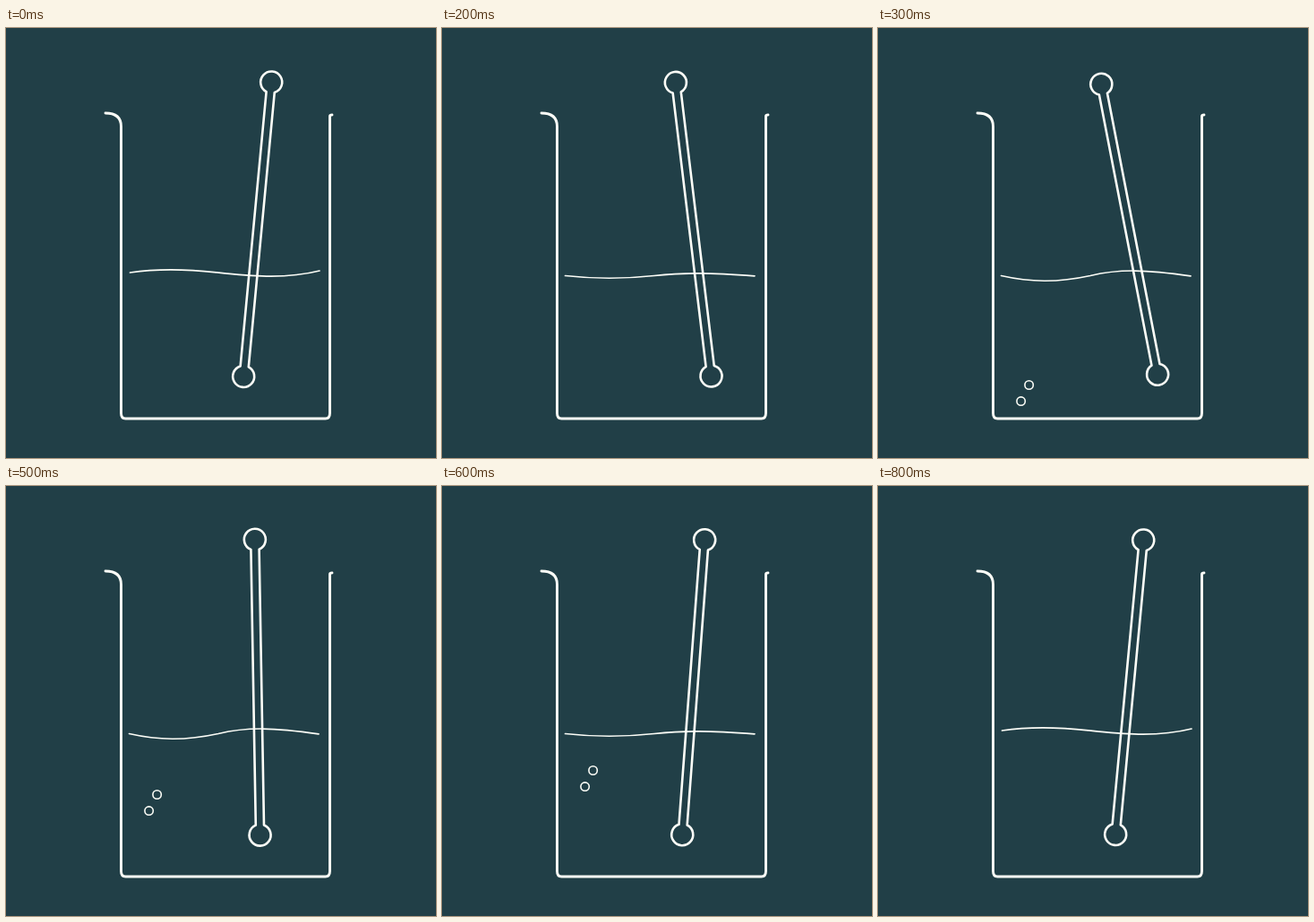
Recreate the animation shown at these times as an HTML page. Size 480 by 480 pixels, loop 0.9 s.

```html
<!DOCTYPE html>
<html lang="en">
<head>
<meta charset="utf-8">
<title>Stirred beaker</title>
<style>
  html, body { margin: 0; width: 100%; height: 100%; overflow: hidden; background: #213f47; }
  svg { display: block; width: 100%; height: 100%; }
</style>
</head>
<body>
<svg viewBox="0 0 480 480" fill="none" stroke="#fcfdf7" stroke-width="2.6" stroke-linecap="round" stroke-linejoin="round">
  <path stroke-width="2.9" d="M111 95 Q128.5 95 128.5 110 V430 Q128.5 436 133.5 436 H356.5 Q361.5 436 361.5 430 V98.5 Q361.5 97 364 97"/>
  <path id="water" stroke-width="1.7"/>
  <g id="bubbles" stroke-width="1.6">
    <circle cx="168.6" cy="398.5" r="4.7"/>
    <circle cx="159.6" cy="416.6" r="4.7"/>
  </g>
  <path id="rod" d="M-4.6 -153.9 A12 12 0 1 1 4.6 -153.9 V153.9 A12 12 0 1 1 -4.6 153.9 Z"/>
</svg>
<script>
const STEP = 100, STEPS = 9;
const [water, bubbles, rod] = ["water", "bubbles", "rod"].map(id => document.getElementById(id));

// Rod tilt in degrees at each step
const tilt = [5.4, -2.77, -6.9, -10.97, -6.4, -1, 4.33, 9.5, 5.4];

function surface(step) {
  if (step % 8 === 0) return "M138.5 273 C165 269 200 269 235 272.8 S310 281 350 271";
  const swell = 1 - Math.abs(step - 4) / 3;
  const y = offset => 276.5 + offset * swell;
  return `M137.5 276.5 C170 ${y(11)} 200 ${y(12)} 237 ${y(0)} C270 ${y(-12)} 300 ${y(-10)} 349 276.8`;
}

function draw(now) {
  const step = Math.floor(now / STEP) % STEPS;
  rod.setAttribute("transform", `translate(280.7 224.7) rotate(${tilt[step]})`);
  water.setAttribute("d", surface(step));
  bubbles.setAttribute("visibility", step >= 3 && step <= 7 ? "visible" : "hidden");
  bubbles.setAttribute("transform", `translate(0 ${-27 * (step - 3)})`);
}

const start = performance.now();
function tick() {
  draw(performance.now() - start);
  requestAnimationFrame(tick);
}
tick();
</script>
</body>
</html>
```
